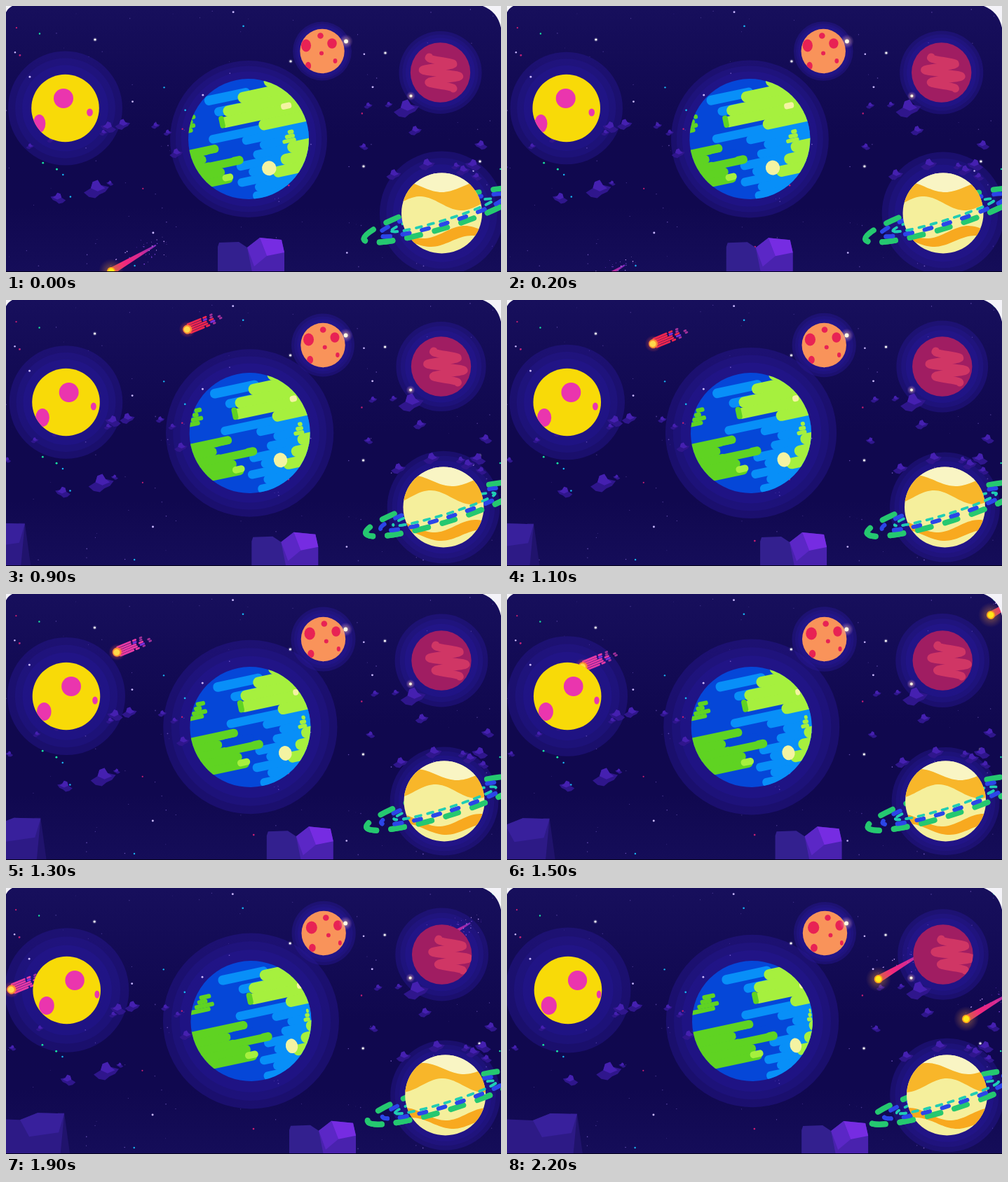
These frames come from a looping animation (706 px wide and 380 px high, 2.3 s). An HTML page with a canvas:

```html
<!DOCTYPE html>
<html lang="en">
<head>
<meta charset="utf-8">
<title>Planets in space</title>
<style>
html, body { margin: 0; width: 706px; height: 380px; overflow: hidden; background: #120a4f; }
canvas { display: block; }
</style>
</head>
<body>
<canvas id="stage" width="706" height="380"></canvas>
<script>
const ctx = document.getElementById('stage').getContext('2d');
const W = 706, H = 380, LOOP = 2300, STEP = 100, TAU = Math.PI * 2;
const { sin, cos, asin, sqrt, PI, max, min, abs, sign } = Math;

function random(seed) {
  return () => (seed = (seed * 16807) % 2147483647) / 2147483647;
}

function oval(x, y, rx, ry, color) {
  ctx.fillStyle = color;
  ctx.beginPath();
  ctx.ellipse(x, y, rx, ry, 0, 0, TAU);
  ctx.fill();
}

const disc = (x, y, r, color) => oval(x, y, r, r, color);

function poly(color, ...pts) {
  ctx.fillStyle = color;
  ctx.beginPath();
  for (let i = 0; i < pts.length; i += 2) ctx.lineTo(pts[i], pts[i + 1]);
  ctx.fill();
}

function line(color, width, pts) {
  ctx.strokeStyle = color;
  ctx.lineWidth = width;
  ctx.lineCap = ctx.lineJoin = 'round';
  ctx.beginPath();
  pts.forEach(([x, y]) => ctx.lineTo(x, y));
  ctx.stroke();
}

function blend(gradient, ...colors) {
  colors.forEach((c, i) => gradient.addColorStop(i / (colors.length - 1), c));
  return gradient;
}

const glow = (x, y, r, inner, outer) =>
  disc(x, y, r, blend(ctx.createRadialGradient(x, y, 0, x, y, r), inner, outer));

function at(x, y, draw, turn = 0) {
  ctx.save();
  ctx.translate(x, y);
  ctx.rotate(turn);
  draw();
  ctx.restore();
}

// Sky, stars and small rocks
const sky = blend(ctx.createLinearGradient(0, 0, 0, H), '#170f5c', '#130b55', '#10084e', '#10084f', '#150d59');

function stars(t) {
  const drift = -t / 2300, rnd = random(41);
  for (let i = 0; i < 90; i++)
    disc(rnd() * W + drift, rnd() * H, .4 + rnd() * .5, `rgba(150,120,230,${.3 + rnd() * .4})`);
  const tints = ['#19e2a0', '#18b8f5', '#c9b8ff', '#c9b8ff', '#c81f72'];
  for (let i = 0; i < 35; i++)
    disc(rnd() * W + drift, rnd() * H, 1.1 + rnd() * .4, tints[i % tints.length]);
  for (const [x, y] of [[127, 48], [406, 79], [541, 67], [510, 229], [676, 222]]) {
    disc(x + drift, y, 2.8, '#ffffff30');
    disc(x + drift, y, 1.6, '#fff');
  }
}

function flare(x, y, r) {
  glow(x, y, r * 2.2, 'rgba(255,215,130,.7)', 'rgba(200,120,220,0)');
  disc(x, y, r * .65, '#fffbe8');
}

function smallRock(x, y, size, flip) {
  at(x, y, () => {
    ctx.scale(size * flip, size);
    poly('#2f168c', -1, .25, -.45, -.1, -.3, -.6, .1, -.75, .35, -.35, 1, -.2, .7, .2, .25, .4, -.1, .7, -.6, .6);
    poly('#4520b0', -.45, -.1, -.3, -.6, .1, -.75, .35, -.35, .7, -.1, .1, .15);
  });
}

function smallRocks(t) {
  const rnd = random(12), drift = t * .0074;
  for (let i = 0; i < 22; i++) {
    const left = i % 2 ? 455 : -5, top = i % 2 ? 135 : 165;
    smallRock(left + rnd() * 255 + drift, top + rnd() * 110, 5 + rnd() * 7, i % 3 ? 1 : -1);
  }
  smallRock(129 + drift, 262, 18, 1);
  smallRock(571 + drift, 147, 18, 1);
}

// Two large rocks along the lower edge
function largeRocks(t) {
  at(302 + t * .0537, t * .0009, () => {
    poly('#33208f', 0, 344, 2, 338, 30, 337, 42, 345, 60, 385, 0, 385);
    poly('#4922ae', 42, 345, 60, 331, 91, 334, 95, 352, 95, 385, 50, 385);
    poly('#5b27c6', 42, 345, 60, 331, 70, 357, 52, 372);
    poly('#762ce2', 60, 331, 91, 334, 95, 352, 70, 357);
  });
  at(10 + (t - 600) * .0562, 318 + max(0, t - 600) * .0025, () => {
    poly('#20136c', -9, 0, 0, 0, 9, 65, -20, 65);
    poly('#2d1a86', -110, 8, -63, 10, -38, 0, 0, 1, -6, 65, -110, 65);
    poly('#38209c', -63, 10, -38, 0, 0, 1, -8, 28, -50, 34);
  });
}

function halo(x, y, mid, swing, peak, t, core) {
  const r = mid + swing * cos((t - peak) * PI / 1700);
  disc(x, y, r, 'rgba(42,26,150,.42)');
  disc(x, y, r - (r - core) * .3, 'rgba(42,28,165,.22)');
  disc(x, y, r - (r - core) * .6, 'rgba(42,28,175,.2)');
}

// Comets
function fireComet(x, y) {
  at(x, y, () => {
    poly(blend(ctx.createLinearGradient(0, 0, 74, 0), '#f8564c', '#ee2680', '#d52a92', '#7a2bc0'), 2, -5, 74, -1, 74, 1, 3, 5);
    const rnd = random(77);
    for (let i = 0; i < 34; i++) {
      const far = rnd();
      disc(4 + far * 85, (rnd() - .5) * (20 + far * 22), .3 + rnd() * .5, i % 2 ? '#c9a6ff' : '#8a4bea');
    }
    glow(0, 0, 18, 'rgba(200,130,60,.7)', 'rgba(150,90,80,0)');
    disc(0, 0, 6, '#ff9d1e');
    disc(0, 0, 4.4, '#ffe81a');
  }, -.53);
}

function streakComet(x, y, t) {
  const color = t < 1300 ? '#f0264f' : '#e83aa6';
  at(x, y, () => {
    for (let i = -2; i <= 2; i++) {
      const end = 48 - abs(i) * 5 + (i % 2) * 6;
      const streak = (a, b, c) => line(c, 2.8, [[a, i * 3.2], [b, i * 3.2]]);
      streak(3, end * .6, color);
      streak(end * .72, end * .82, i % 2 ? '#7a2fe0' : color);
      streak(end, end + 2, '#a0309a');
    }
    glow(0, 0, 12, 'rgba(255,120,50,.7)', 'rgba(240,60,80,0)');
    disc(0, 0, 6.5, '#ff8a35');
    disc(-.5, 0, 4.5, '#ffd94a');
  }, -.39);
}

function comets(t) {
  const fly = (x, y, start) => fireComet(x - .229 * (t - start), y + .143 * (t - start));
  if (t < 600) fly(150, 379, 0);
  if (t >= 1300) fly(690, 30, 1500);
  if (t >= 1900) fly(655, 187, 2200);
  if (t >= 400) streakComet(334 - .251 * (t - 600), 11 + .103 * (t - 600), t);
}

// A turning globe: places on it are given as seen when spin is zero
function globe(x, y, R, color, tilt, spin, draw) {
  const width = v => sqrt(max(1, R * R - v * v));
  function turned(u, v) {
    const w = width(v), a = abs(u) < w ? asin(u / w) + spin : sign(u) * PI;
    return abs(a) < PI / 2 ? w * sin(a) : sign(a) * R * 1.4;
  }
  function pill(fill, top, h, from, to) {
    const left = turned(from, top + h / 2), w = turned(to, top + h / 2) - left;
    if (w < 1) return;
    ctx.fillStyle = fill;
    ctx.beginPath();
    ctx.roundRect(left, top - .4, w, h + .8, min(w, h) / 2);
    ctx.fill();
  }
  function spot(fill, u, v, r) {
    const p = turned(u, v), c = sqrt(max(0, 1 - (p / width(v)) ** 2));
    oval(p, v, r * (.35 + .65 * c), r, fill);
  }
  at(x, y, () => {
    disc(0, 0, R, color);
    ctx.clip();
    draw(pill, spot);
  }, tilt);
}

const BLUE = '#0547d8', SKY = '#088ff8', GREEN = '#5fd322', LIME = '#a6f03e', CREAM = '#f4f3a2';

function earth(x, t) {
  globe(x, 190, 86, BLUE, -.21, (t - 1100) * .00025, (pill, spot) => {
    // Stacked stripes that reach one limb and end in staggered round tips
    const east = (fill, top, h, starts) => starts.forEach((u, i) => pill(fill, top + i * h, h, u, 99));
    const west = (fill, top, h, ends) => ends.forEach((u, i) => pill(fill, top + i * h, h, -99, u));

    pill(SKY, -72, 13, -42, 30);
    pill(SKY, -53, 12, -22, 20);
    east(SKY, -16, 11.5, [-36, 14, 36, 24, -4, 10, -12, 8, -4]);
    west(GREEN, -2, 11.5, [-23, -48, 9, -24, -16]);
    pill(BLUE, 10, 11, -48, -2);
    for (let i = 0; i < 4; i++) pill(GREEN, -50 + i * 6, 5.5, -70 - i * 4, -58 - i % 2 * 6);
    east(LIME, -82, 14.8, [42, 14, -8, -14, 40]);
    pill(GREEN, -40, 17, -15, -7);
    pill(LIME, 43, 9, -32, -14);
    for (let i = 0; i < 3; i++) pill(LIME, i * 6, 5, 72 - i * 4, 78);
    east(LIME, 17, 15, [67, 55, 40]);
    pill(CREAM, -39, 8, 68, 77);
    spot(CREAM, 38, 47, 10.5);
  });
}

function magenta(x, t) {
  globe(x, 95, 42.7, '#a01d62', 0, 0, () => {
    const wave = [];
    for (let s = 0; s <= 1; s += .02)
      wave.push([-4 + t * .006 + 10 * s + (12 + 14 * sin(s * PI)) * sin(s * 16 + 4.6), -22 + 46 * s]);
    line('#d03665', 11, wave);
  });
}

// Ringed planet: radius x, radius y, width, dash, gap, phase, color
const RINGS = [
  [117, 18.5, 8, 19, 21, 23.5, '#25c870'],
  [95, 12.5, 6, 10, 18, 7, '#2b46e8'],
  [76, 7.5, 3.8, 8, 9.5, 1, '#20cdb4']
];

function rings(t, sweep) {
  ctx.lineCap = 'round';
  for (const [a, b, width, dash, gap, phase, color] of RINGS) {
    ctx.lineWidth = width;
    ctx.strokeStyle = color;
    ctx.setLineDash([dash, gap]);
    ctx.lineDashOffset = -phase - t * .01;
    ctx.beginPath();
    ctx.ellipse(0, 3, a, b, 0, PI, PI - sweep, true);
    ctx.stroke();
  }
  ctx.setLineDash([]);
}

function band(color, upper, lower) {
  const pts = [];
  for (let x = -60; x <= 60; x += 3) pts.push(x, upper(x));
  for (let x = 60; x >= -60; x -= 3) pts.push(x, lower(x));
  poly(color, ...pts);
}

function ringed(x, t) {
  const shift = -31 + t * .014, wave = (x, lag) => cos((x - shift - lag) * TAU / 118);
  const cap = x => -38 - 8 * wave(x, -28);
  at(x, 296, () => rings(t, TAU), -.3);
  globe(x, 296, 57.5, '#f5ef9c', 0, 0, () => {
    band('#f9f5c4', () => -60, cap);
    band('#f8b62a', cap, x => -14 - 10 * wave(x, 0));
    band('#f8a91f', x => 27 + 9 * wave(x, 5), x => 40 + 8 * wave(x, 15));
  });
  at(x, 296, () => rings(t, PI), -.3);
}

function frame(t) {
  const p = t / 2200;
  const yellowX = 84.5 + 2.5 * p, earthX = 346 + 4 * p, orangeX = 451 + 2.5 * p;
  const magentaX = 619.5 + 2.5 * p, ringedX = 621.5 + 6 * p;

  ctx.fillStyle = sky;
  ctx.fillRect(0, 0, W, H);
  halo(yellowX, 146, 84.5, 5, 2200, t, 48);
  halo(earthX, 190, 119, 7, 1700, t, 86);
  halo(orangeX, 64.5, 44, 2.2, 1500, t, 32);
  halo(magentaX, 95, 63, 4, 1600, t, 43);
  halo(ringedX, 296, 83, 6, -200, t, 57);
  stars(t);
  smallRocks(t);
  comets(t);

  globe(yellowX, 146, 48.3, '#f8da08', 0, t * .00016, (_, spot) => {
    spot('#ea35ae', -2.5, -14, 14);
    spot('#ea35ae', -37, 22, 13);
    spot('#ea35ae', 35, 6, 5.5);
  });
  earth(earthX, t);
  globe(orangeX, 64.5, 31.7, '#f9935a', 0, t * .00013, (_, spot) => {
    spot('#e82254', -23, -8, 9);
    spot('#e82254', -2.5, -22, 4.3);
    spot('#e82254', 14, -11, 7.3);
    spot('#e82254', -1, 3, 3);
    spot('#e82254', 18.5, 14, 3.4);
    spot('#e82254', -20, 21, 5.8);
  });
  magenta(magentaX, t);
  ringed(ringedX, t);
  flare(485 - p, 50.5, 4.5);
  flare(577.5 - p, 128.5, 3);
  largeRocks(t);

  ctx.fillStyle = '#06021c';
  ctx.fillRect(0, 379, W, 1);
  ctx.fillStyle = '#f4f3f8';
  ctx.fill(new Path2D('M0 0H9Q3 3 0 9ZM680 0Q701 8 706 31V0Z'));
}

function tick() {
  frame(Math.floor(performance.now() % LOOP / STEP) * STEP);
  requestAnimationFrame(tick);
}
tick();
</script>
</body>
</html>
```
